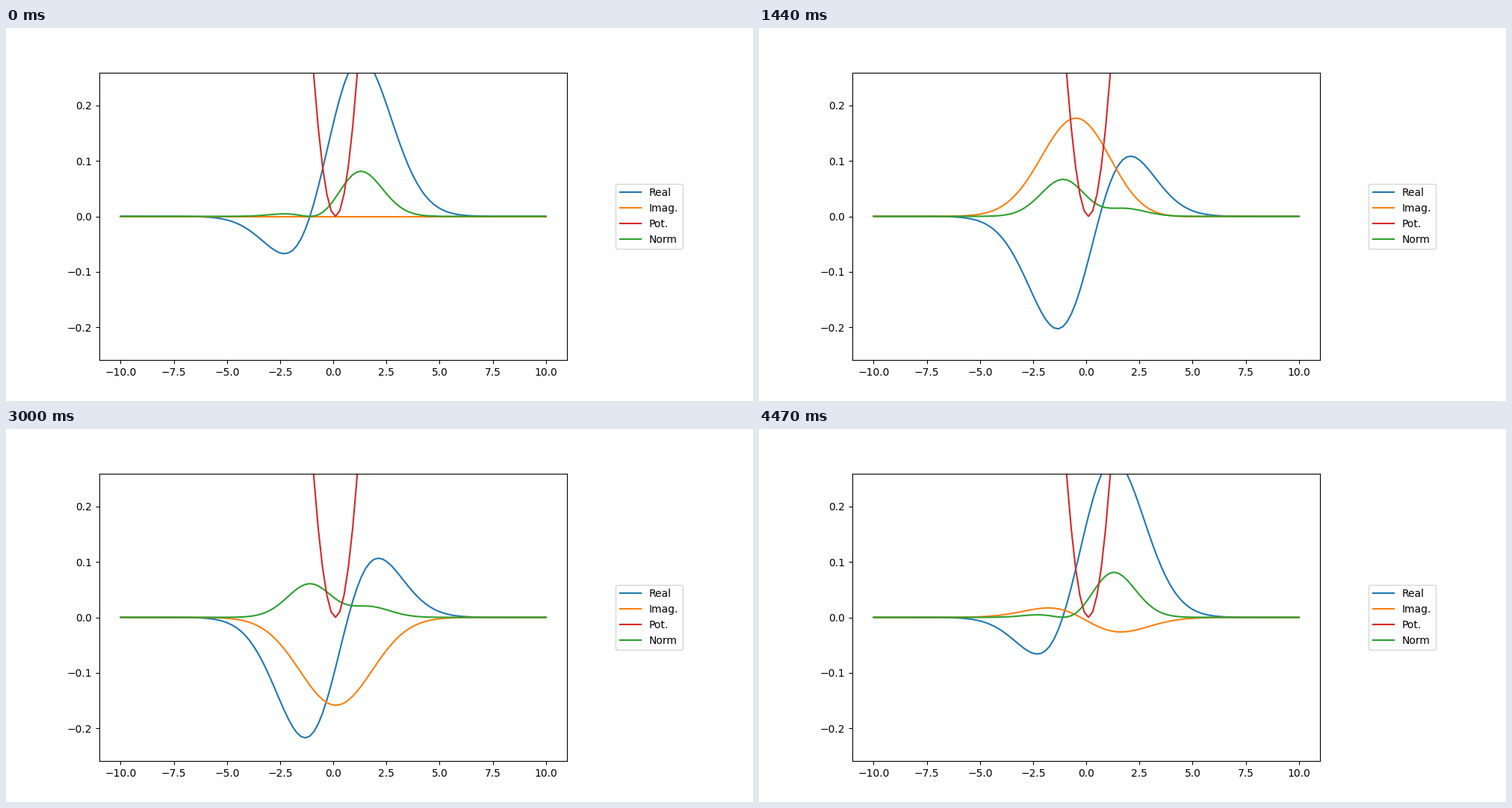
A matplotlib script that plays this animation: 1000x500 px, repeating every 4500 ms.

```python
import numpy as np
import matplotlib.pyplot as plt
from matplotlib.animation import FuncAnimation

FRAMES = 150
POINTS = 100
STEP = 0.1

# Harmonic oscillator on a grid: H = -1/2 d2/dq2 + q^2
q = STEP * (np.arange(POINTS) - POINTS // 2)
potential = q**2
hopping = np.eye(POINTS, k=1) + np.eye(POINTS, k=-1)
hamiltonian = (2 * np.eye(POINTS) - hopping) / (2 * STEP**2) + np.diag(potential)
energies, states = np.linalg.eigh(hamiltonian)

# Two lowest states, signed to be positive just right of the centre
energies = energies[:2]
states = states[:, :2] * np.sign(states[POINTS // 2 + 3, :2])
period = 2 * np.pi / energies[0]


def wave(frame):
    t = period * frame / FRAMES
    return states @ np.exp(1j * energies * t) / np.sqrt(2)


fig, (ax, legend_ax) = plt.subplots(
    1, 2, figsize=(10, 5), dpi=100, gridspec_kw={"width_ratios": [8, 1]}
)
x = np.linspace(-10, 10, POINTS)
flat = np.zeros(POINTS)
real, = ax.plot(x, flat, color="tab:blue")
imag, = ax.plot(x, flat, color="tab:orange")
norm, = ax.plot(x, flat, color="tab:green")
pot, = ax.plot(x, potential, color="tab:red")

limit = states[:, 0].max()
ax.set_ylim(-limit, limit)
legend_ax.axis("off")
legend_ax.legend([real, imag, pot, norm], ["Real", "Imag.", "Pot.", "Norm"], loc="center")


def update(frame):
    psi = wave(frame)
    real.set_ydata(psi.real)
    imag.set_ydata(psi.imag)
    norm.set_ydata(np.abs(psi) ** 2)
    return real, imag, norm


anim = FuncAnimation(fig, update, frames=FRAMES, interval=30, repeat=True, repeat_delay=0)
plt.show()
```
